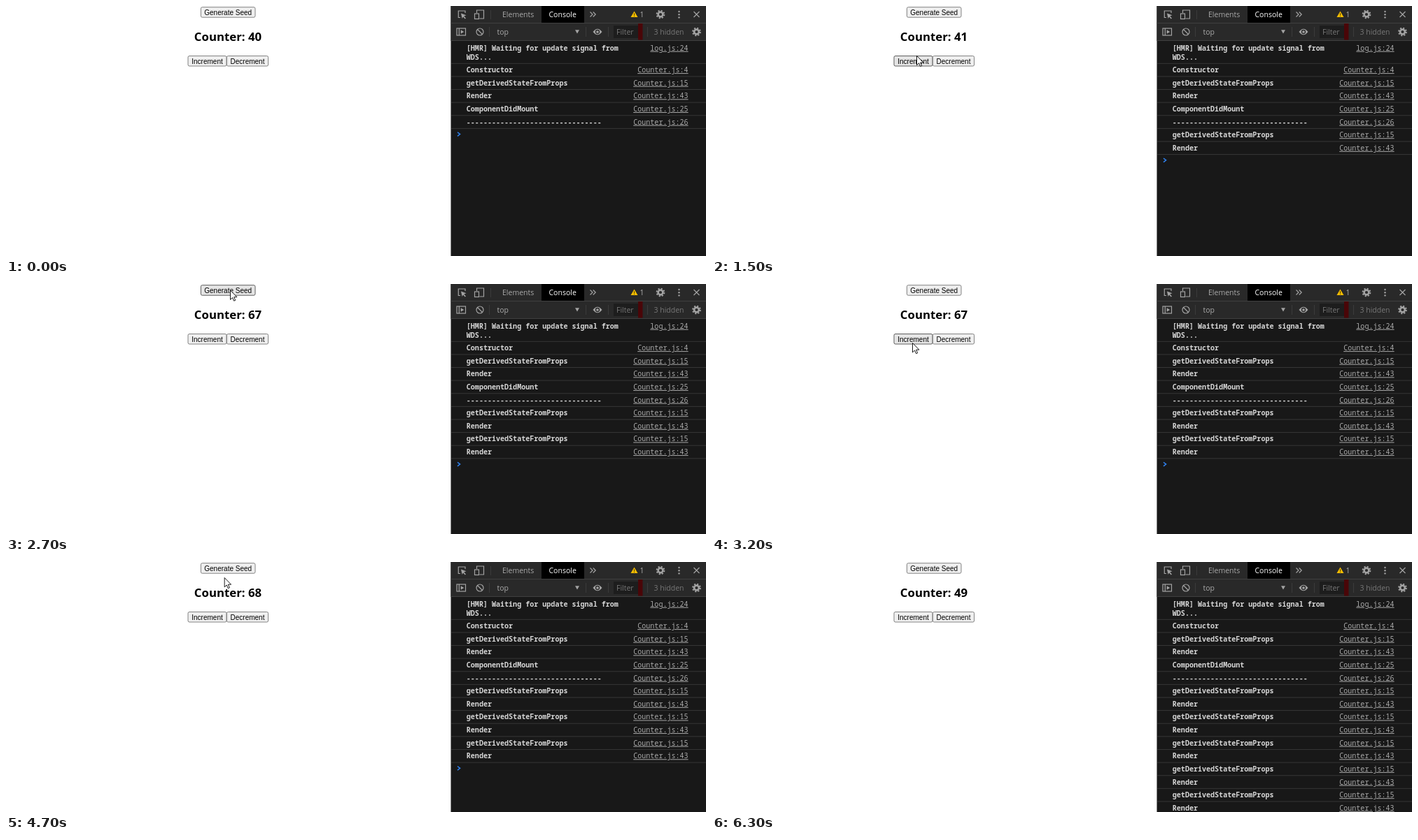
These frames come from a looping animation (1000x358 px, 6.8 s). An HTML page:

```html
<!DOCTYPE html>
<html lang="en">
<head>
<meta charset="utf-8">
<title>Counter lifecycle</title>
<style>
  html, body { margin: 0; width: 100%; height: 100%; overflow: hidden; background: #fff; }
  svg { display: block; }
  .btn rect { stroke-width: .9; }
  .btn text { font: 10px "Liberation Sans", Arial, sans-serif; text-anchor: middle; }
  #count { font: bold 16.8px "Open Sans", "Noto Sans", sans-serif; text-anchor: middle; }
  .ui { font: 10.5px "Open Sans", "Noto Sans", sans-serif; fill: #a9a9a9; }
  .log { font: 600 10.06px "Noto Sans Mono", "DejaVu Sans Mono", monospace; fill: #d6d6d6; }
  .link { font-weight: 400; fill: #a8a8a8; text-anchor: end; text-decoration: underline; }
  .icon { fill: none; stroke: #a3a3a3; stroke-width: 1.2; }
</style>
</head>
<body>
<svg width="1000" height="358" viewBox="0 0 1000 358">
  <defs>
    <g id="gear" class="icon">
      <circle r="3.4" stroke-width="2.6"/>
      <circle r="5.4" stroke-width="1.9" stroke-dasharray="2.12 2.12"/>
    </g>
  </defs>
  <rect width="1000" height="358" fill="#fff"/>
  <g id="buttons"></g>
  <text id="count" x="317" y="50.3"></text>

  <g id="panel">
    <rect x="635.5" width="364.5" height="358" fill="#181818"/>
    <rect x="635.5" width="364.5" height="49.5" fill="#292929"/>
    <path d="M635.5 24.5H1000M635.5 49.5H1000" stroke="#404040"/>
    <path d="M692.5 6V19M690.5 30V44M828.5 30V44M860.5 30V44M916.5 30V44" stroke="#3b3b3b"/>
    <rect x="765" width="61" height="24" fill="#000"/>
    <rect x="868" y="28" width="35" height="18" fill="#1d1d1d"/>
    <rect x="903" y="25" width="6.5" height="23.5" fill="#4a0608"/>
    <g class="ui">
      <text x="709" y="16">Elements</text>
      <text x="775.5" y="16" fill="#fff">Console</text>
      <text x="905.5" y="16">1</text>
      <text x="701.5" y="41">top</text>
      <text x="872" y="41" fill="#777">Filter</text>
      <text x="925.5" y="41" fill="#777">3 hidden</text>
    </g>
    <g class="icon">
      <path d="M649 16.5H646.3V7H656V10"/>
      <path d="M650 10.5L657.5 13.2L654.2 14.4L657 17.4L655.8 18.4L653 15.4L651.6 18Z" fill="#a3a3a3" stroke="none"/>
      <path d="M672.5 10V6H682.5V18H676.5"/>
      <rect x="669.5" y="11" width="6" height="7.5"/>
      <path d="M834.5 8.5L838 12L834.5 15.5M838.7 8.5L842.2 12L838.7 15.5"/>
      <path d="M982.5 8L990.5 16M990.5 8L982.5 16"/>
      <rect x="644" y="32" width="12.5" height="10"/>
      <path d="M647.3 32V42"/>
      <path d="M649.7 34.2L654.2 37L649.7 39.8Z" fill="#a3a3a3" stroke="none"/>
      <circle cx="677" cy="37" r="5"/>
      <path d="M673.5 33.5L680.5 40.5"/>
      <path d="M838.5 37Q845 28.5 851.5 37Q845 45.5 838.5 37Z" fill="#a3a3a3" stroke="none"/>
      <circle cx="845" cy="37" r="2.5" stroke="#292929" stroke-width="1.3"/>
    </g>
    <path d="M813 34.2H819L816 39.5Z" fill="#a3a3a3"/>
    <path d="M897.5 7.5L902.5 16H892.5Z" fill="#f5bd00"/>
    <path d="M897.5 10.3V13M897.5 13.8V15" stroke="#4a3900"/>
    <g fill="#a3a3a3">
      <circle cx="961.5" cy="8" r="1.2"/><circle cx="961.5" cy="12.2" r="1.2"/><circle cx="961.5" cy="16.4" r="1.2"/>
    </g>
    <use href="#gear" x="935" y="12"/>
    <use href="#gear" x="986.5" y="37"/>
    <g class="log">
      <text x="657.8" y="63.7">[HMR] Waiting for update signal from</text>
      <text x="657.8" y="76.7">WDS...</text>
      <text class="link" x="974.6" y="63.7">log.js:24</text>
    </g>
    <path d="M636 82.3H1000" stroke="#363636"/>
    <g id="rows"></g>
    <path id="prompt" d="M645 -2.8L648.6 0L645 2.8" fill="none" stroke="#2f80ed" stroke-width="1.5"/>
  </g>

  <path id="cursor" d="M0 0V13.4L3.1 10.5L5.1 15.2L7.2 14.3L5.2 9.7H9.4Z"
        fill="#fff" stroke="#000" stroke-width=".9"/>
</svg>
<script>
const LOOP = 6800, STEP = 100, ROW = 18.62, FIRST = 91.7;
const $ = id => document.getElementById(id);

function add(parent, tag, attrs, text = '') {
  const el = document.createElementNS('http://www.w3.org/2000/svg', tag);
  for (const k in attrs) el.setAttribute(k, attrs[k]);
  el.textContent = text;
  parent.append(el);
  return el;
}

function button(label, x, y, w) {
  const g = add($('buttons'), 'g', { class: 'btn' });
  const h = 14.5;
  const box = add(g, 'rect', { x, y, width: w, height: h, rx: 2 });
  add(g, 'text', { x: x + w / 2, y: y + 11 }, label);
  return { box, hit: p => p && p[0] >= x && p[0] <= x + w && p[1] >= y && p[1] <= y + h };
}

const buttons = [
  button('Generate Seed', 278.4, 1.7, 77.6),
  button('Increment', 260, 71.5, 55),
  button('Decrement', 315.4, 71.5, 59.2)
];

// Console messages: mount, then one pair for every update
const update = [['getDerivedStateFromProps', 15], ['Render', 43]];
const lines = [
  ['Constructor', 4], ...update, ['ComponentDidMount', 25], ['-'.repeat(32), 26],
  ...Array(5).fill(update).flat()
];
const rows = lines.map(([msg, line], i) => {
  const y = FIRST + i * ROW;
  const g = add($('rows'), 'g', { class: 'log' });
  add(g, 'text', { x: 657.8, y: y + 3.4 }, msg);
  add(g, 'text', { class: 'link', x: 974.6, y: y + 3.4 }, 'Counter.js:' + line);
  add(g, 'path', { d: `M636 ${y + 9.2}H1000`, stroke: '#363636' });
  return g;
});

// Clicks: time of the update and the value it leaves
const clicks = [[1100, 41], [2600, 67], [3900, 68], [5000, 85], [5200, 49]];

// Pointer path: time, x, y
const path = [
  [100, 982, 343], [200, 905, 215], [300, 770, 100], [400, 600, 30], [500, 440, 9],
  [600, 345, 45], [700, 297, 79], [800, 290, 79.5], [1400, 290, 79.5],
  [1600, 294, 62], [1900, 316, 16], [2100, 326, 12], [2200, 317, 7], [2300, 320, 8.5],
  [2800, 320, 8.5], [3000, 303, 45], [3100, 291, 77], [3200, 286, 84], [3500, 283, 75],
  [3600, 295, 74], [4300, 295, 74], [4500, 301, 54], [4800, 317, 6], [4900, 317, 4],
  [5700, 317, 4], [5800, 340, 22], [6000, 570, 165], [6200, 924, 342]
];

function pointer(t) {
  if (t < path[0][0] || t > path[path.length - 1][0]) return null;
  const i = Math.max(1, path.findIndex(k => k[0] >= t));
  const [a, b] = [path[i - 1], path[i]];
  const f = (t - a[0]) / (b[0] - a[0]);
  return [a[1] + (b[1] - a[1]) * f, a[2] + (b[2] - a[2]) * f];
}

function draw(ms) {
  const t = Math.floor(ms % LOOP / STEP) * STEP;
  const done = clicks.filter(c => c[0] <= t);
  const pressed = clicks.some(c => t >= c[0] - STEP && t < c[0]);
  $('count').textContent = 'Counter: ' + (done.length ? done[done.length - 1][1] : 40);

  const shown = 5 + 2 * done.length;
  rows.forEach((r, i) => r.setAttribute('visibility', i < shown ? 'visible' : 'hidden'));
  $('prompt').setAttribute('transform', `translate(0 ${FIRST + (shown - 1) * ROW + 17.4})`);

  // Hover follows the pointer one step late
  const p = pointer(t), last = pointer(t - STEP);
  for (const b of buttons) {
    const over = b.hit(last);
    b.box.setAttribute('fill', !over ? '#efefef' : pressed ? '#f5f5f5' : '#e5e5e5');
    b.box.setAttribute('stroke', !over ? '#767676' : pressed ? '#8d8d8d' : '#4f4f4f');
  }
  $('cursor').setAttribute('visibility', p ? 'visible' : 'hidden');
  if (p) $('cursor').setAttribute('transform', `translate(${p[0] + .5} ${p[1] + .5})`);
}

const start = performance.now();
function tick() {
  draw(performance.now() - start);
  requestAnimationFrame(tick);
}
tick();
</script>
</body>
</html>
```
